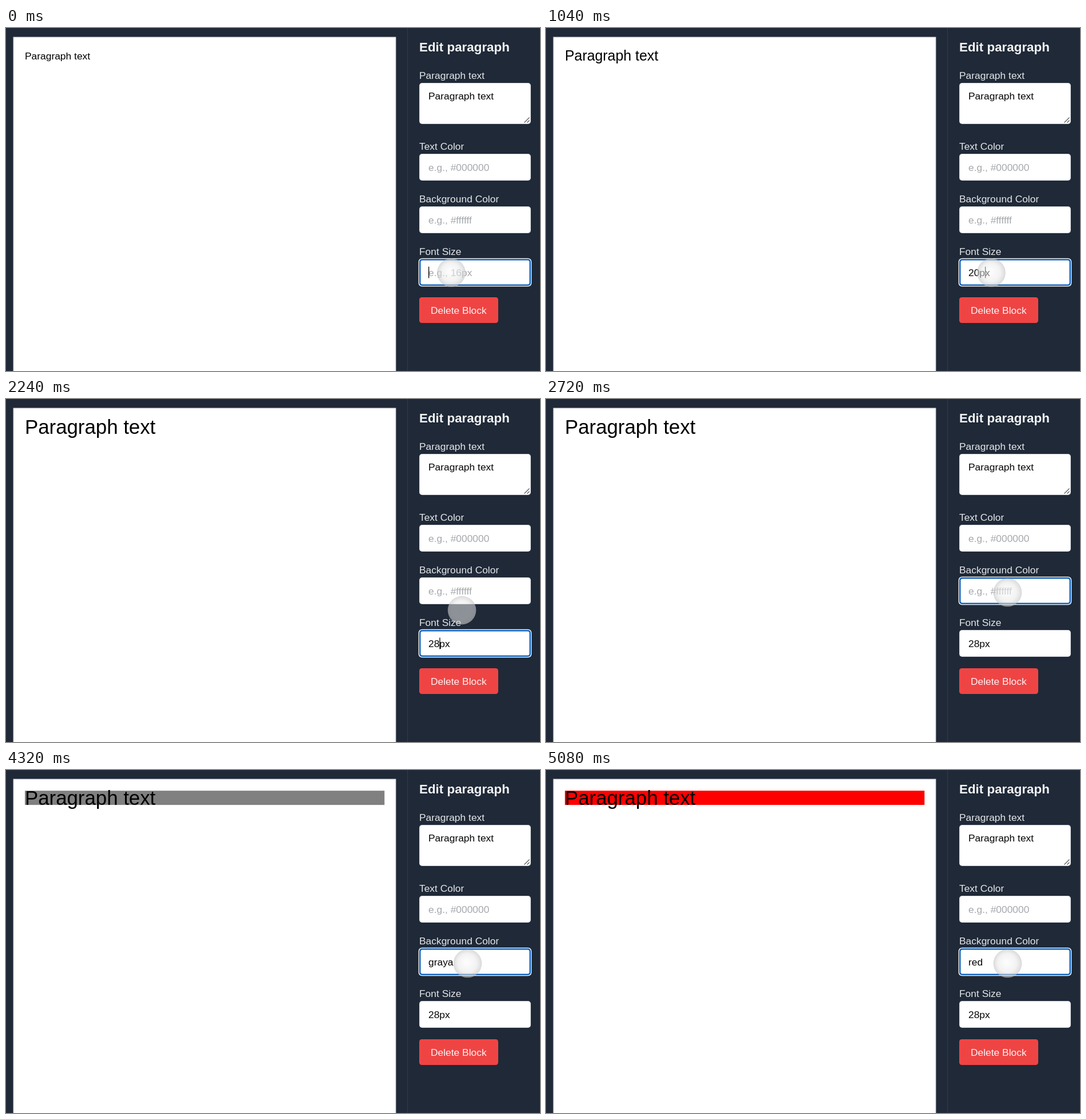
These frames come from a looping animation (933x600 px, 5.12 s). An HTML page with a canvas:

```html
<!DOCTYPE html>
<html lang="en">
<head>
<meta charset="utf-8">
<title>Paragraph editor</title>
<style>
  html, body { margin: 0; width: 100%; height: 100%; overflow: hidden; background: #1f2937; }
  canvas { display: block; width: 933px; height: 600px; }
</style>
</head>
<body>
<canvas id="stage" width="933" height="600"></canvas>
<script>
const ctx = document.getElementById('stage').getContext('2d');
const LOOP = 5120;
const SCALE = 1.2435;
const BLINK = 300;
const LEFT = 722, WIDTH = 195, PAD = 16;
const INK = '#050505', HINT = '#a5a8ad', LABEL = '#e5e7eb';

// Keystrokes: time, value, caret index
const sizeKeys = [
  [0, '', 0], [240, '2', 1], [380, '20', 2], [540, '20p', 3], [680, '20px', 4],
  [960, '20px', 3], [1160, '20px', 2], [1400, '2px', 1], [1560, '28px', 2]
];
const colorKeys = [
  [2400, '', 0], [2960, 'g', 1], [3100, 'gr', 2], [3240, 'gra', 3], [3360, 'gray', 4],
  [3980, 'graya', 5], [4440, 'graya', 5, true],
  [4560, 'r', 1], [4640, 're', 2], [4740, 'red', 3]
];
// Applied styles: time, value
const sizes = [[0, 14], [680, 20], [1400, 2], [1560, 28]];
const fills = [[0, null], [3360, '#808080'], [4740, '#ff0000']];

const FOCUS_MOVE = 2400;
const pointerPath = { from: [778, 428], to: [806.5, 338.5], start: 2060, end: 2360 };

function at(steps, t) {
  let found = steps[0];
  for (const step of steps) if (step[0] <= t) found = step;
  return found;
}

function setFont(px, weight = 'normal') {
  ctx.font = `${weight} ${px * SCALE}px "Liberation Sans", Arial, sans-serif`;
}

// Text on a line whose box is centred on cy
function text(str, x, cy, color, px = 14, weight) {
  setFont(px, weight);
  ctx.fillStyle = color;
  ctx.fillText(str, x, cy + 0.3465 * px * SCALE);
}

function rounded(x, y, w, h, r, color) {
  ctx.beginPath();
  ctx.roundRect(x, y, w, h, r);
  ctx.fillStyle = color;
  ctx.fill();
}

function box(y, h, focused) {
  if (focused) {
    rounded(LEFT - 1.3, y - 1.3, WIDTH + 2.6, h + 2.6, 6, '#ffffff');
    rounded(LEFT, y, WIDTH, h, 5, '#1264bd');
    rounded(LEFT + 2.5, y + 2.5, WIDTH - 5, h - 5, 3, '#ffffff');
  } else {
    rounded(LEFT, y, WIDTH, h, 5, '#d1d5db');
    rounded(LEFT + 1, y + 1, WIDTH - 2, h - 2, 4, '#ffffff');
  }
}

function field(label, y, hint, t, key, focused) {
  const [since, value, caret, selected] = key;
  const x = LEFT + PAD, cy = y + 23.5;
  text(label, LEFT, y - 13, LABEL);
  box(y, 47, focused);
  setFont(14);
  if (focused && selected) {
    ctx.fillStyle = '#b3d7ff';
    ctx.fillRect(x, cy - 10, ctx.measureText(value).width, 20);
  }
  text(value || hint, x, cy, value ? INK : HINT);
  if (focused && !selected && Math.floor((t - since) / BLINK) % 2 === 0) {
    const cx = x + ctx.measureText(value.slice(0, caret)).width;
    ctx.fillStyle = INK;
    ctx.fillRect(cx, cy - 10, 1.3, 20);
  }
}

function page(t) {
  ctx.fillStyle = '#1f2937';
  ctx.fillRect(0, 0, 933, 600);
  ctx.fillStyle = '#303a48';
  ctx.fillRect(701, 0, 1.2, 600);
  ctx.fillStyle = '#c9cdd3';
  ctx.fillRect(12.5, 15.5, 669, 585);
  ctx.fillStyle = '#ffffff';
  ctx.fillRect(13.5, 16.5, 667, 584);

  const fill = at(fills, t)[1];
  if (fill) {
    ctx.fillStyle = fill;
    ctx.fillRect(33, 36.2, 628.3, 24.9);
  }
  text('Paragraph text', 33, 48.6, '#000000', at(sizes, t)[1]);
}

function sidebar(t) {
  const onColor = t >= FOCUS_MOVE;
  text('Edit paragraph', LEFT, 33.3, '#f3f4f6', 18, 'bold');

  text('Paragraph text', LEFT, 83, LABEL);
  box(96, 72, false);
  text('Paragraph text', LEFT + PAD, 119, INK);
  ctx.strokeStyle = '#555555';
  ctx.lineWidth = 1.1;
  ctx.beginPath();
  ctx.moveTo(905.5, 165.5);
  ctx.lineTo(914.5, 156.5);
  ctx.moveTo(910.5, 165.5);
  ctx.lineTo(914.5, 161.5);
  ctx.stroke();

  field('Text Color', 220, 'e.g., #000000', t, [0, '', 0], false);
  field('Background Color', 312, 'e.g., #ffffff', t, at(colorKeys, t), onColor);
  field('Font Size', 404, 'e.g., 16px', t, at(sizeKeys, t), !onColor);

  rounded(LEFT, 471, 138, 45, 4.5, '#ef4444');
  text('Delete Block', 742, 493.5, '#fdf2f2');
}

function pointer(t) {
  const { from, to, start, end } = pointerPath;
  const p = Math.min(1, Math.max(0, (t - start) / (end - start)));
  const ease = p * p * (3 - 2 * p);
  const x = from[0] + (to[0] - from[0]) * ease;
  const y = from[1] + (to[1] - from[1]) * ease;
  const shade = ctx.createRadialGradient(x - 2, y - 2, 3, x, y, 25);
  shade.addColorStop(0, 'rgba(248,248,248,0.5)');
  shade.addColorStop(0.6, 'rgba(232,232,232,0.55)');
  shade.addColorStop(0.92, 'rgba(204,204,204,0.62)');
  shade.addColorStop(1, 'rgba(186,186,186,0.62)');
  ctx.beginPath();
  ctx.arc(x, y, 24.8, 0, Math.PI * 2);
  ctx.fillStyle = shade;
  ctx.fill();
}

const begin = performance.now();
function draw() {
  const t = (performance.now() - begin) % LOOP;
  page(t);
  sidebar(t);
  pointer(t);
  requestAnimationFrame(draw);
}
draw();
</script>
</body>
</html>
```
